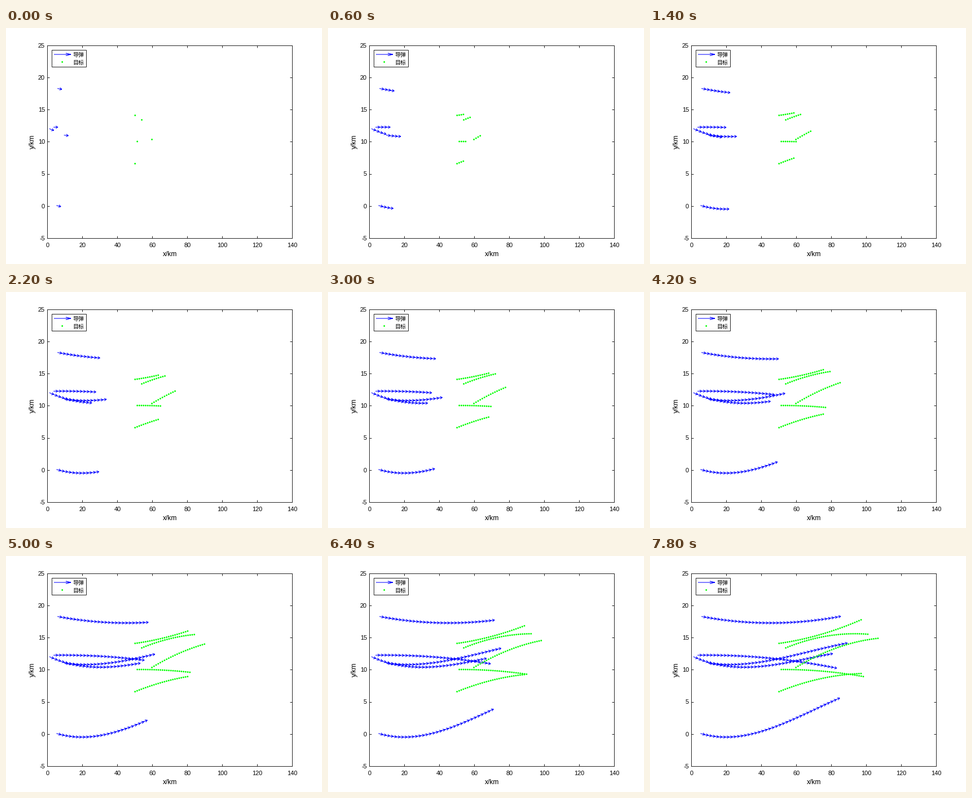
A matplotlib script that plays this animation: 560 px wide and 420 px high, repeating every 8 s.

```python
import numpy as np
import matplotlib.pyplot as plt
from matplotlib.animation import FuncAnimation
from matplotlib.patches import Rectangle

W, H, DPI = 560, 420, 80
PT = 72 / DPI                      # one pixel in points
FRAMES, INTERVAL = 40, 200
INK, BLUE, GREEN = "#262626", "#0000ff", "#00ff00"
LEFT, RIGHT, TOP, BOTTOM = 73, 507, 31, 374

MISSILE_SPEED, TARGET_SPEED = 6.13, 3.725   # pixels per step
LEAD = 1.27                                 # arrow length in steps
GAP = (np.nan, np.nan)

# Start x, y, climb per step, turn per step, and how fast the turn fades
MISSILES = [
    (98.9, 109.0, 1.08, -0.0575, 0),
    (84.6, 182.4, 2.52, -0.2368, 1 / 32),
    (91.9, 176.5, -0.05, 0.033, 0),
    (110.5, 191.6, 0.70, -0.1568, 1 / 28),
    (97.1, 317.8, 1.52, -0.2752, 1 / 32),
]
TARGETS = [
    (228.8, 155.5, -0.52, -0.0285, 0),
    (240.6, 163.5, -1.53, 0.0465, 0),
    (232.7, 202.0, -0.02, 0.0175, 0),
    (258.6, 198.4, -2.26, 0.0477, 0),
    (228.7, 241.4, -1.51, 0.035, 0),
]


def fly(k, speed, x, y, climb, turn, fade):
    """Position and climb rate after k steps."""
    rate = climb + turn * k * (1 - fade * k / 2)
    return x + speed * k, y + climb * k + turn * k**2 * (1 - fade * k / 3) / 2, rate


def arrow(x0, y0, x1, y1, length=3.8, half=2.3):
    """Shaft and open head as one broken polyline."""
    d = np.hypot(x1 - x0, y1 - y0)
    ux, uy = (x1 - x0) / d, (y1 - y0) / d
    bx, by = x1 - length * ux, y1 - length * uy
    return [(x0, y0), (x1, y1), GAP,
            (bx - half * uy, by + half * ux), (x1, y1),
            (bx + half * uy, by - half * ux), GAP]


def dot(x, y):
    """A very short stroke whose round caps make a disc."""
    return [(x - 0.01, y), (x + 0.01, y), GAP]


def missile_step(k, missile):
    x, y, rate = fly(k, MISSILE_SPEED, *missile)
    return arrow(x - LEAD * MISSILE_SPEED, y - LEAD * rate, x, y)


def target_step(k, target):
    return dot(*fly(k, TARGET_SPEED, *target)[:2])


fig = plt.figure(figsize=(W / DPI, H / DPI), dpi=DPI, facecolor="white")

# Plot frame with inward ticks on all four sides
ax = fig.add_axes([LEFT / W, 1 - BOTTOM / H, (RIGHT - LEFT) / W, (BOTTOM - TOP) / H])
ax.set(xlim=(0, 140), ylim=(-5, 25),
       xticks=range(0, 141, 20), yticks=range(-5, 26, 5))
ax.tick_params(direction="in", top=True, right=True, length=4.3 * PT, width=PT,
               color=INK, labelbottom=False, labelleft=False)
for spine in ax.spines.values():
    spine.set(color=INK, linewidth=PT)

# Overlay measured in pixels
stage = fig.add_axes([0, 0, 1, 1])
stage.set(xlim=(0, W), ylim=(H, 0))
stage.axis("off")


def label(x, y, text, size, ha="center", font="Liberation Sans", rotation=0):
    stage.text(x, y, text, fontsize=size * PT, ha=ha, va="baseline", color="black",
               family=font, rotation=rotation, rotation_mode="anchor")


def strokes(points=()):
    return stage.plot(*np.reshape(points, (-1, 2)).T, color=BLUE, lw=PT,
                      solid_capstyle="butt", solid_joinstyle="miter")[0]


def discs(points=()):
    return stage.plot(*np.reshape(points, (-1, 2)).T, color=GREEN, lw=3 * PT,
                      solid_capstyle="round", snap=False)[0]


for v in range(0, 141, 20):
    label(LEFT + 0.5 + (RIGHT - LEFT) * v / 140, 389.5, str(v), 11)
for v in range(-5, 26, 5):
    label(69, TOP + (BOTTOM - TOP) * (25 - v) / 30 + 3.8, str(v), 11, ha="right")
label(290.5, 405.5, "x/km", 12)
label(50, 202, "y/km", 12, rotation=90)

# Legend
stage.add_patch(Rectangle((81, 39), 61, 30, fc="white", ec=INK, lw=PT, snap=True))
strokes(arrow(85, 47, 115, 47, 9, 2.2))
discs(dot(99.7, 60.5))
for y, name in ((51, "导弹"), (65, "目标")):
    label(118, y, name, 10, ha="left", font="Noto Sans CJK JP")

trails, marks = strokes(), discs()


def update(i):
    steps = range(i + 1)
    arrows = [missile_step(k, m) for k in steps for m in MISSILES]
    dots = [target_step(k, t) for k in steps for t in TARGETS]
    trails.set_data(*np.reshape(arrows, (-1, 2)).T)
    marks.set_data(*np.reshape(dots, (-1, 2)).T)
    return trails, marks


anim = FuncAnimation(fig, update, frames=FRAMES, init_func=lambda: update(0),
                     interval=INTERVAL, repeat=True, repeat_delay=0)
plt.show()
```
